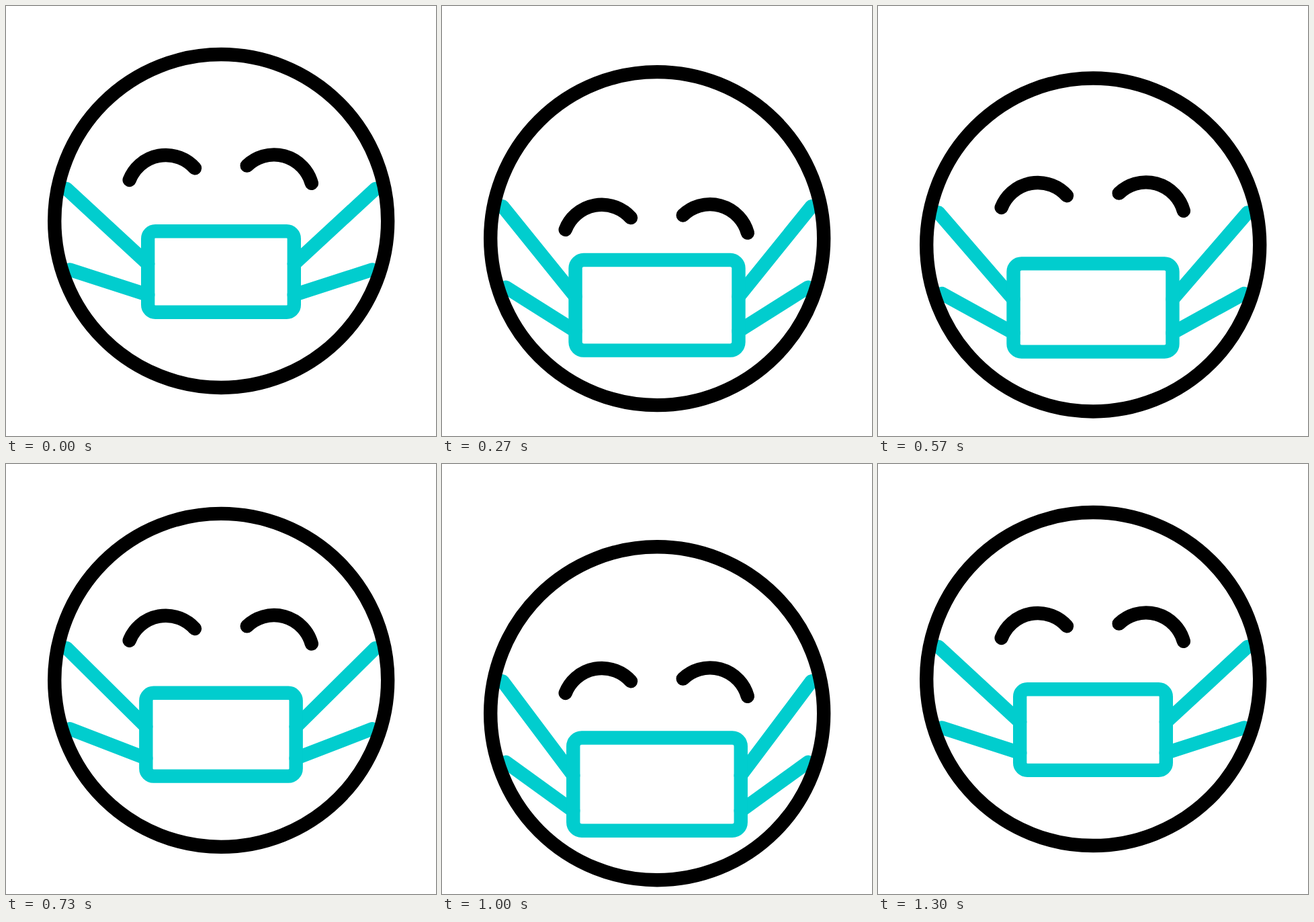
An HTML page for the animation above (1670 ms loop, 640 by 640 pixels).

```html
<!DOCTYPE html>
<html lang="en">
<head>
<meta charset="utf-8">
<title>Nodding masked face</title>
<style>
  html, body { margin: 0; width: 100%; height: 100%; overflow: hidden; background: #fff; }
  svg { display: block; width: 100%; height: 100%; }
  g { fill: none; stroke: #000; stroke-width: 20.4; stroke-linecap: round; stroke-linejoin: round; }
  .teal { stroke: #01cdce; }
</style>
</head>
<body>
<svg viewBox="0 0 640 640">
  <g class="teal">
    <path id="straps"/>
    <rect id="mask"/>
  </g>
  <g id="head"><circle cx="320.2" cy="320" r="248"/></g>
  <g id="eyes">
    <path d="M183.7 259A58 58 0 0 1 281 241.3"/>
    <path d="M358.7 237.6A58 58 0 0 1 454.8 263.8"/>
  </g>
</svg>
<script>
const LOOP = 1670, FPS = 30;
const $ = id => document.getElementById(id);
const straps = $('straps'), mask = $('mask'), head = $('head'), eyes = $('eyes');

const ease = (x, from, to) => {
  const p = Math.min(1, Math.max(0, (x - from) / (to - from)));
  return p * p * (3 - 2 * p);
};

// One nod: ease down between a and b, ease back between c and d
const nod = (x, a, b, c, d) => ease(x, a, b) - ease(x, c, d);

// Each part nods twice; mask and eyes run ahead of the head
const headDrop = x => 51.5 * (nod(x, 2.5, 13.4, 13.4, 23.1) + nod(x, 23, 29.6, 29.6, 39.2));
const eyeDrop = x => 82 * (nod(x, 1, 9.7, 12, 22) + nod(x, 21.2, 27.4, 30, 39));
const maskGrow = x => .15 * (nod(x, 1, 11.1, 12.6, 22.6) + nod(x, 20.3, 26.9, 29.1, 39));

const moveDown = (el, y) => el.setAttribute('transform', `translate(0 ${y})`);
const setAll = (el, attrs) => {
  for (const name in attrs) el.setAttribute(name, attrs[name]);
};

function draw(now) {
  const step = Math.floor((now % LOOP + 3.5) * FPS / 1000);
  const h = headDrop(step), g = maskGrow(step), s = 1 + g;
  const cy = 395.5 + h + 204 * g, hw = 108.8 * s, hh = 60.3 * s;

  moveDown(head, h);
  moveDown(eyes, eyeDrop(step));
  setAll(mask, { x: 320 - hw, y: cy - hh, width: 2 * hw, height: 2 * hh, rx: 11 * s });

  const strap = (side, x, y, dy) =>
    `M${320 + side * x} ${y + h}L${320 + side * hw} ${cy + dy * s}`;
  straps.setAttribute('d', [-1, 1].map(side =>
    strap(side, 230, 272, -11.5) + strap(side, 225, 392.5, 34.5)).join(''));
}

function tick() {
  draw(performance.now());
  requestAnimationFrame(tick);
}
tick();
</script>
</body>
</html>
```
